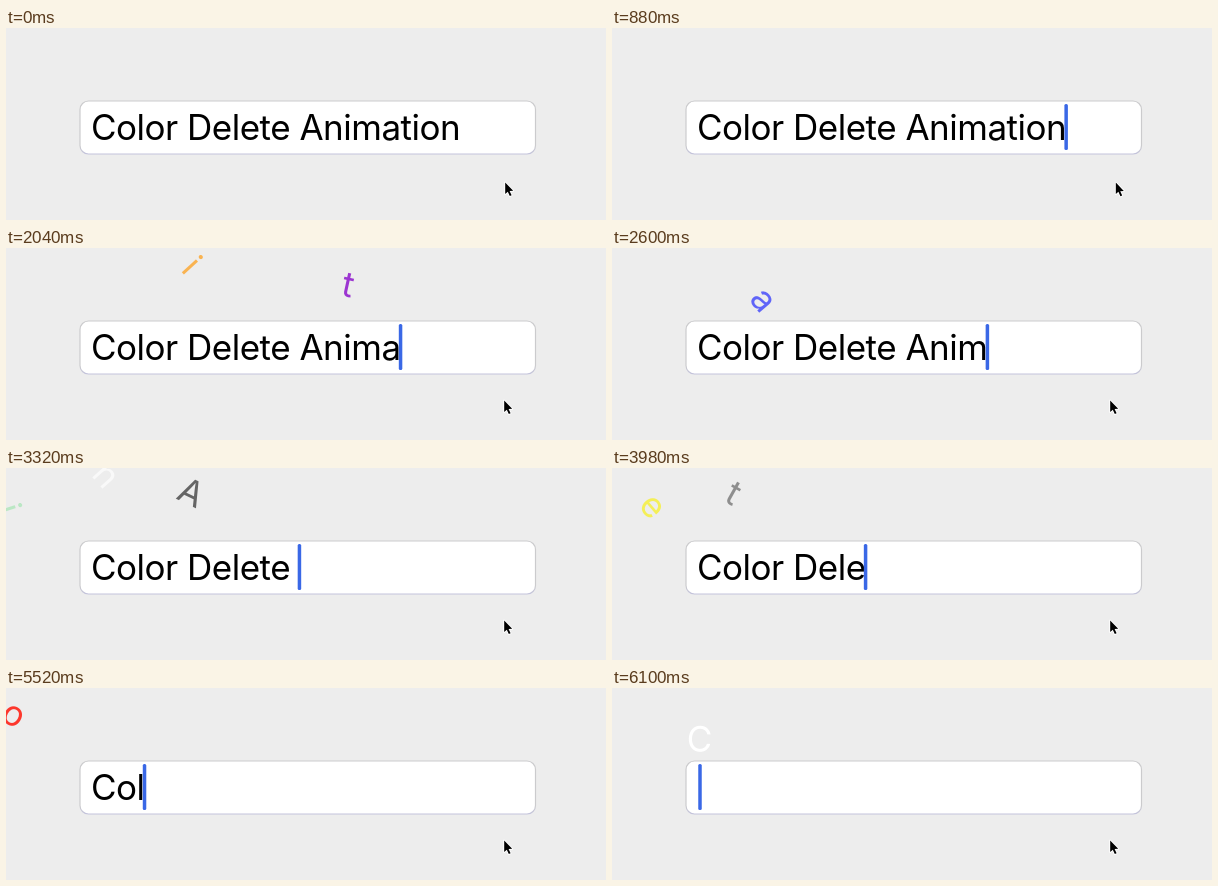
An HTML page with a canvas that plays this animation: 600 px wide and 192 px high, repeating every 6120 ms.

```html
<!DOCTYPE html>
<html>
<head>
<meta charset="utf-8">
<style>
html, body { margin: 0; width: 100%; height: 100%; overflow: hidden; background: #ededed; }
canvas { display: block; }
</style>
</head>
<body>
<canvas id="stage"></canvas>
<script>
const LOOP = 6120, LIFE = 600, SPEED = 0.64;
const TEXT = 'Color Delete Animation', LEFT = 85, BASE = 112;

// One entry per deletion, last character first: time, colour, path curvature
const DELETIONS = [
  [1110, '#ff1a0d', .0009], [1400, '#aaaaaa', .0009], [1690, '#ff9500', .0008],
  [1950, '#9a30d0', .0006], [2235, '#0d14ff', .00142], [2615, '#aaaaaa', .0007],
  [2790, '#00d030', .0009], [2965, '#ffffff', .0006], [3132, '#555555', .0008],
  [3400, '#ffffff', .0009], [3615, '#f8f000', .00117], [3765, '#808080', .00095],
  [4005, '#ff00ff', .0008], [4200, '#ff9500', .0006], [4410, '#555555', .001],
  [4619, '#00e5ff', .00085], [4850, '#ffffff', .0009], [5065, '#0d14ff', .0009],
  [5300, '#ff1a0d', .001], [5550, '#808080', .0008], [5800, '#00e5ff', .0009],
  [6085, '#ffffff', .0009]
];

const canvas = document.getElementById('stage');
const ctx = canvas.getContext('2d');
const ratio = window.devicePixelRatio || 1;
canvas.width = 600 * ratio;
canvas.height = 192 * ratio;
canvas.style.width = '600px';
canvas.style.height = '192px';

const widthOf = s => ctx.measureText(s).width;
const ease = p => { p = Math.min(1, Math.max(0, p)); return p * p * (3 - 2 * p); };

function drawField() {
  const edge = ctx.createLinearGradient(0, 73, 0, 126);
  edge.addColorStop(0, '#cbcbcd');
  edge.addColorStop(.85, '#cbcbcd');
  edge.addColorStop(1, '#c3c3dc');
  ctx.beginPath();
  ctx.roundRect(74, 73, 455.5, 53, 8.5);
  ctx.fillStyle = '#fff';
  ctx.fill();
  ctx.lineWidth = 1.2;
  ctx.strokeStyle = edge;
  ctx.stroke();
}

function drawCaret(x) {
  ctx.beginPath();
  ctx.roundRect(x - 1.75, 76, 3.5, 46, 1.5);
  ctx.fillStyle = '#3a68e6';
  ctx.fill();
}

function drawFlying(index, age, colour, bend) {
  const char = TEXT[index], w = widthOf(char);
  const far = SPEED * age;
  const rise = 45 + .35 * far - bend * far * far;
  ctx.save();
  ctx.globalAlpha = 1 - (age / LIFE) ** 2;
  ctx.translate(LEFT + widthOf(TEXT.slice(0, index)) + w / 2 - far, BASE - 11 - rise);
  ctx.rotate(.0037 * far);
  ctx.fillStyle = colour;
  ctx.fillText(char, -w / 2, 11);
  ctx.restore();
}

function drawPointer(t) {
  const out = ease((t - 20) / 400) - ease((t - 700) / 500);
  const home = ease((t - 700) / 500);
  ctx.save();
  ctx.translate(499.2 - home + 7 * out, 154.5 - 2 * home + out);
  ctx.beginPath();
  for (const [x, y] of [[0, 0], [0, 11.5], [2.6, 9.2], [4.6, 13.6], [6.4, 12.8], [4.4, 8.6], [8, 8.3]]) ctx.lineTo(x, y);
  ctx.closePath();
  ctx.lineJoin = 'round';
  ctx.lineWidth = 1.8;
  ctx.strokeStyle = '#fff';
  ctx.stroke();
  ctx.fillStyle = '#000';
  ctx.fill();
  ctx.restore();
}

function draw(t) {
  ctx.setTransform(ratio, 0, 0, ratio, 0, 0);
  ctx.fillStyle = '#ededed';
  ctx.fillRect(0, 0, 600, 192);
  ctx.font = '35px Inter, "Liberation Sans", sans-serif';
  ctx.letterSpacing = '-0.5px';
  drawField();

  const gone = DELETIONS.filter(([time]) => t >= time).length;
  const rest = TEXT.slice(0, TEXT.length - gone);
  ctx.fillStyle = '#000';
  ctx.fillText(rest, LEFT, BASE);
  if (t >= 400) drawCaret(Math.max(88, LEFT + widthOf(rest)));

  DELETIONS.forEach(([time, colour, bend], i) => {
    const age = t - time;
    if (age >= 0 && age < LIFE) drawFlying(TEXT.length - 1 - i, age, colour, bend);
  });
  drawPointer(t);
}

const start = performance.now();
function tick() {
  draw((performance.now() - start) % LOOP);
  requestAnimationFrame(tick);
}
tick();
</script>
</body>
</html>
```
